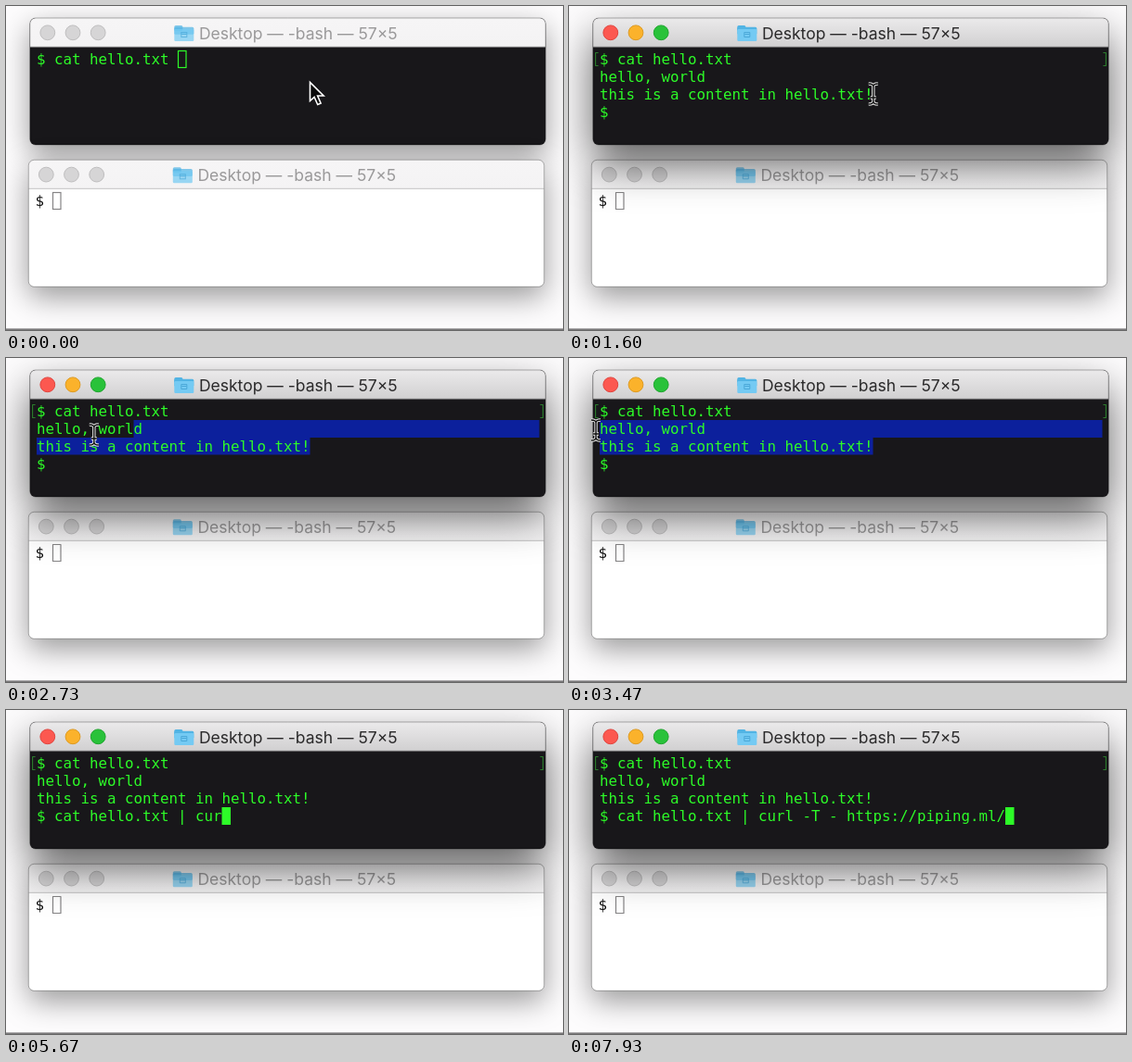
An HTML page with a canvas that plays this animation: 600x350 px, repeating every 8000 ms.

```html
<!DOCTYPE html>
<html lang="en">
<head>
<meta charset="utf-8">
<title>Terminal demo</title>
<style>
html, body { margin: 0; width: 100%; height: 100%; overflow: hidden; background: #fdfcfd; }
canvas { display: block; width: 600px; height: 350px; }
</style>
</head>
<body>
<canvas id="stage" width="600" height="350"></canvas>
<script>
const ctx = document.getElementById('stage').getContext('2d');
const LOOP = 8000;
const COL = 9.5, ROW = 19;
const MONO = '15.8px "DejaVu Sans Mono", "Liberation Mono", monospace';
const SANS = '17.5px Inter, Roboto, sans-serif';
const GREEN = '#2dfc28', SELECT = '#0c209c';

const CLICK = 670, ENTER = 1130, DRAG = 1600, SELECTED = 3270, CLEAR = 3800;

// Each burst types its text evenly from start to end.
const BURSTS = [
  [4400, 5130, 'cat hello.txt |'],
  [5270, 5270, ' '],
  [5470, 5600, 'cur'],
  [5730, 5730, 'l'],
  [5870, 6070, ' -'],
  [6270, 6270, 'T'],
  [6530, 6530, ' '],
  [6800, 6800, '-'],
  [7000, 7000, ' '],
  [7530, 7925, 'https://piping.ml/']
];

// Pointer path: time, x, y
const PATH = [
  [0, 327, 82], [1200, 328, 84], [1530, 328, 95], [DRAG, 328, 95],
  [2330, 161, 88], [3130, 29, 78]
];

function pointerAt(t) {
  for (let i = 1; i < PATH.length; i++) {
    const [t0, x0, y0] = PATH[i - 1], [t1, x1, y1] = PATH[i];
    if (t < t1) {
      const k = (t - t0) / (t1 - t0);
      return { x: x0 + (x1 - x0) * k, y: y0 + (y1 - y0) * k };
    }
  }
  const [, x, y] = PATH[PATH.length - 1];
  return { x, y };
}

function typedAt(t) {
  let out = '';
  for (const [start, end, text] of BURSTS) {
    if (t < start) break;
    const k = end > start ? (t - start) / (end - start) : 1;
    out += text.slice(0, Math.min(text.length, 1 + Math.floor(k * (text.length - 1) + 1e-6)));
  }
  return out;
}

function box(x, y, w, h, r) {
  ctx.beginPath();
  ctx.roundRect(x, y, w, h, r);
}

function folder(x, y, active) {
  ctx.save();
  ctx.globalAlpha = active ? 1 : 0.72;
  ctx.fillStyle = '#52b4e4';
  box(x, y, 9, 6, 1.5);
  ctx.fill();
  box(x, y + 1.8, 21, 8, 1.5);
  ctx.fill();
  ctx.fillStyle = '#74caf3';
  box(x, y + 4, 21, 13, 1.2);
  ctx.fill();
  ctx.strokeStyle = '#4ba8d8';
  ctx.lineWidth = 1;
  ctx.strokeRect(x + 7.5, y + 7.5, 6, 5);
  ctx.fillStyle = '#4ba8d8';
  ctx.fillRect(x + 8, y + 9, 5, 1);
  ctx.restore();
}

function frameWindow(x, y, w, active, body) {
  const h = 137, bar = 31;
  ctx.save();
  ctx.shadowColor = active ? 'rgba(0,0,0,.62)' : 'rgba(0,0,0,.4)';
  ctx.shadowBlur = active ? 46 : 32;
  ctx.shadowOffsetY = active ? 20 : 11;
  ctx.fillStyle = body;
  box(x, y, w, h, 6);
  ctx.fill();
  ctx.restore();

  ctx.save();
  box(x, y, w, h, 6);
  ctx.clip();
  const shade = ctx.createLinearGradient(0, y, 0, y + bar);
  shade.addColorStop(0, active ? '#ebeaeb' : '#f6f5f6');
  shade.addColorStop(1, active ? '#d1d0d1' : '#f4f3f4');
  ctx.fillStyle = shade;
  ctx.fillRect(x, y, w, bar);
  ctx.fillStyle = active ? '#aeadae' : '#c4c3c4';
  ctx.fillRect(x, y + bar - 0.5, w, 1);
  ctx.restore();

  ctx.strokeStyle = 'rgba(0,0,0,.3)';
  ctx.lineWidth = 1;
  box(x, y, w, h, 6);
  ctx.stroke();

  const lights = active ? ['#fc5850', '#fbb22b', '#29c23a'] : ['#d6d5d6', '#d6d5d6', '#d6d5d6'];
  const rims = active ? ['#e0443e', '#dd9a22', '#1fa52e'] : ['#bfbebf', '#bfbebf', '#bfbebf'];
  lights.forEach((color, i) => {
    ctx.beginPath();
    ctx.arc(x + 19 + i * 27.2, y + 15.8, 7.9, 0, Math.PI * 2);
    ctx.fillStyle = color;
    ctx.fill();
    ctx.strokeStyle = rims[i];
    ctx.stroke();
  });

  folder(x + 155.5, y + 8, active);
  ctx.font = SANS;
  ctx.textAlign = 'center';
  ctx.fillStyle = active ? '#2b2a2b' : '#9a999a';
  ctx.fillText('Desktop — -bash — 57×5', x + 289, y + 22.5);
}

function line(text, x, baseline, color) {
  ctx.font = MONO;
  ctx.textAlign = 'left';
  ctx.fillStyle = color;
  [...text].forEach((ch, i) => ctx.fillText(ch, x + i * COL, baseline));
}

function caret(x, y, color, filled) {
  if (filled) {
    ctx.fillStyle = color;
    ctx.fillRect(x, y, COL, ROW);
  } else {
    ctx.strokeStyle = color;
    ctx.lineWidth = 1.2;
    ctx.strokeRect(x + 0.5, y + 0.5, COL - 1, ROW - 1);
  }
}

function bracket(x, dir) {
  ctx.strokeStyle = '#2b7d2c';
  ctx.lineWidth = 1.1;
  ctx.beginPath();
  ctx.moveTo(x + 3 * dir, 50.5);
  ctx.lineTo(x, 50.5);
  ctx.lineTo(x, 64.5);
  ctx.lineTo(x + 3 * dir, 64.5);
  ctx.stroke();
}

function selection(t) {
  if (t < DRAG || t >= CLEAR) return;
  const p = pointerAt(Math.max(DRAG, t - 105));
  const end = 31;
  let col = Math.max(0, Math.min(end, Math.round((p.x - 33) / COL)));
  const upper = t > 2400 && p.y < 86;
  ctx.fillStyle = SELECT;
  if (upper) {
    col = t >= SELECTED ? 0 : Math.max(11, col);
    ctx.fillRect(33 + col * COL, 67, (57 - col) * COL, ROW);
    col = 0;
  }
  ctx.fillRect(33 + col * COL, 86, (end - col) * COL, ROW - 0.5);
}

function upperWindow(t) {
  const active = t >= CLICK;
  frameWindow(25.8, 13, 555.4, active, '#18171a');
  selection(t);
  const rows = ['$ cat hello.txt '];
  if (t >= ENTER) {
    rows.push('hello, world', 'this is a content in hello.txt!', '$ ' + typedAt(t));
    bracket(28.6, 1);
    bracket(578.4, -1);
  }
  rows.forEach((text, i) => line(text, 33, 63 + i * ROW, GREEN));
  if (t < DRAG || t >= CLEAR) {
    const last = rows.length - 1;
    caret(33 + rows[last].length * COL, 48 + last * ROW, GREEN, active);
  }
}

function lowerWindow() {
  frameWindow(24.3, 166.3, 555.4, false, '#fff');
  line('$', 31.5, 216.3, '#111');
  caret(50, 201, '#858485', false);
}

function arrow(x, y) {
  const pts = [[0, 0], [0, 20], [4.6, 15.8], [8.2, 24], [11.6, 22.5], [8.1, 14.5], [14.6, 14.5]];
  ctx.beginPath();
  pts.forEach(([dx, dy]) => ctx.lineTo(x + dx, y + dy));
  ctx.closePath();
  ctx.fillStyle = '#0b0b0b';
  ctx.fill();
  ctx.strokeStyle = '#fff';
  ctx.lineWidth = 1.6;
  ctx.lineJoin = 'miter';
  ctx.stroke();
}

function beam(x, y) {
  ctx.beginPath();
  for (const s of [-1, 1]) {
    ctx.moveTo(x - 5, y + 11 * s);
    ctx.quadraticCurveTo(x, y + 11 * s, x, y + 8 * s);
    ctx.quadraticCurveTo(x, y + 11 * s, x + 5, y + 11 * s);
  }
  ctx.moveTo(x, y - 8);
  ctx.lineTo(x, y + 8);
  ctx.moveTo(x - 3, y + 4);
  ctx.lineTo(x + 3, y + 4);
  ctx.lineJoin = 'round';
  for (const [color, width] of [['#e4e4e4', 3.4], ['#111', 1.4]]) {
    ctx.strokeStyle = color;
    ctx.lineWidth = width;
    ctx.stroke();
  }
}

function draw(t) {
  ctx.fillStyle = '#fdfcfd';
  ctx.fillRect(0, 0, 600, 350);
  ctx.fillStyle = '#7c7b7c';
  ctx.fillRect(0, 348.4, 600, 1.6);
  if (t < CLICK) {
    upperWindow(t);
    lowerWindow();
  } else {
    lowerWindow();
    upperWindow(t);
  }
  const p = pointerAt(t);
  if (t < CLICK) arrow(p.x + 0.5, p.y + 0.5);
  else if (t < CLEAR) beam(p.x, p.y);
}

const start = performance.now();
function tick() {
  draw((performance.now() - start) % LOOP);
  requestAnimationFrame(tick);
}
tick();
</script>
</body>
</html>
```
